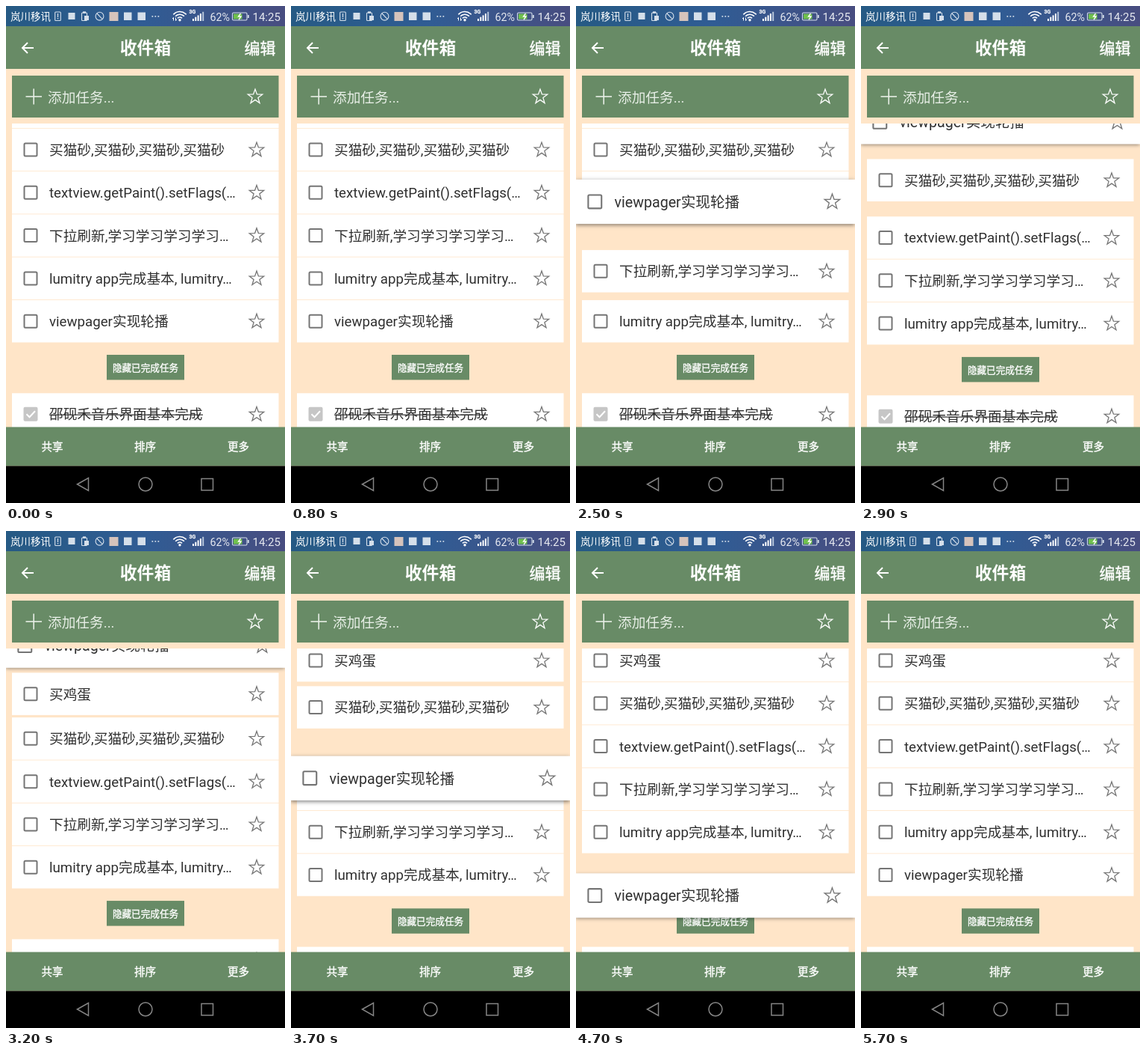
Write an HTML page with a canvas that moves like this. It is 374 px wide and 664 px high and loops after 6.4 s.

```html
<!DOCTYPE html>
<html lang="zh-CN">
<head>
<meta charset="utf-8">
<title>收件箱</title>
<style>
html, body { margin: 0; width: 100%; height: 100%; overflow: hidden; background: #000; }
canvas { display: block; width: 374px; height: 664px; }
</style>
</head>
<body>
<canvas id="stage" width="374" height="664"></canvas>
<script>
const ctx = document.getElementById('stage').getContext('2d');
const W = 374, LOOP = 6400;
const GREEN = '#688b66', PEACH = '#ffe5c8', INK = '#303030', GREY = '#757575';
const FONT = 'Roboto, "Noto Sans CJK SC", "Noto Sans CJK", sans-serif';
const PITCH = 57.3, CARD_X = 8, CARD_W = 357.5, CARD_H = 56.5, FIRST_ROW = 134.7;
const LIST_TOP = 157, LIST_BOTTOM = 563, MOVE = 250;

// up / down: when the dragged row passes each row on its way
const rows = [
  { text: '买鸡蛋', up: 2984, down: 3380 },
  { text: '买猫砂,买猫砂,买猫砂,买猫砂', up: 2750, down: 3500 },
  { text: 'textview.getPaint().setFlags(…', up: 2550, down: 3745 },
  { text: '下拉刷新,学习学习学习学习…', up: 2318, down: 3945 },
  { text: 'lumitry app完成基本, lumitry…', up: 2160, down: 4380 },
];

const dragPath = [
  [1950, 421.2], [2160, 364], [2318, 306.5], [2500, 261.7], [2750, 192], [2984, 146],
  [3080, 146], [3200, 153], [3380, 230], [3500, 287.5], [3700, 330], [3945, 402.5],
  [4200, 441], [4380, 459.5], [4650, 487], [4800, 487], [5050, 459.5],
];
const scrollPath = [[2850, 0], [2984, 12], [3200, 28], [3340, 38.3]];

const clamp = v => Math.max(0, Math.min(1, v));
const ease = (t, start) => (1 - Math.cos(Math.PI * clamp((t - start) / MOVE))) / 2;

// Monotone cubic through [time, value] points
function follow(path, t) {
  const last = path.length - 1;
  if (t <= path[0][0]) return path[0][1];
  if (t >= path[last][0]) return path[last][1];
  const slope = i => (path[i + 1][1] - path[i][1]) / (path[i + 1][0] - path[i][0]);
  const tangent = i => {
    if (i === 0 || i === last) return 0;
    const a = slope(i - 1), b = slope(i);
    return a * b <= 0 ? 0 : 2 * a * b / (a + b);
  };
  let i = 0;
  while (t > path[i + 1][0]) i++;
  const [t0, v0] = path[i], [t1, v1] = path[i + 1];
  const h = t1 - t0, u = (t - t0) / h, u2 = u * u, u3 = u2 * u;
  return v0 * (2 * u3 - 3 * u2 + 1) + v1 * (3 * u2 - 2 * u3)
    + h * (tangent(i) * (u3 - 2 * u2 + u) + tangent(i + 1) * (u3 - u2));
}

function rect(x, y, w, h, color) {
  ctx.fillStyle = color;
  ctx.fillRect(x, y, w, h);
}

function label(text, x, midY, size, color, weight = 400, align = 'left') {
  ctx.font = `${weight} ${size}px ${FONT}`;
  ctx.fillStyle = color;
  ctx.textAlign = align;
  ctx.fillText(text, x, midY + size * 0.37);
  if (weight === 500) { // CJK faces lack a medium weight
    ctx.strokeStyle = color;
    ctx.lineWidth = 0.35;
    ctx.strokeText(text, x, midY + size * 0.37);
  }
}

function line(points, color, width, close) {
  ctx.beginPath();
  points.forEach(([x, y]) => ctx.lineTo(x, y));
  if (close) ctx.closePath();
  ctx.strokeStyle = color;
  ctx.lineWidth = width;
  ctx.stroke();
}

function ring(x, y, r, color, width, from = 0, to = Math.PI * 2) {
  ctx.beginPath();
  ctx.arc(x, y, r, from, to);
  ctx.strokeStyle = color;
  ctx.lineWidth = width;
  ctx.stroke();
}

function box(x, y, w, h, r, color, width) {
  ctx.beginPath();
  ctx.roundRect(x, y, w, h, r);
  ctx.strokeStyle = color;
  ctx.lineWidth = width;
  ctx.stroke();
}

function star(x, y, color) {
  const points = [];
  for (let i = 0; i < 10; i++) {
    const r = i % 2 ? 4.1 : 10.2, a = (i / 5 - 0.5) * Math.PI;
    points.push([x + r * Math.cos(a), y + 0.3 + r * Math.sin(a)]);
  }
  line(points, color, 1.3, true);
}

function rowContent(text, y) {
  box(24.5, y - 8.5, 17, 17, 1.5, GREY, 2);
  label(text, 58, y, 18.7, INK);
  star(336, y, GREY);
}

function row(text, y) {
  rect(CARD_X, y - CARD_H / 2, CARD_W, CARD_H, '#fff');
  rowContent(text, y);
}

function draggedRow(text, y, lift) {
  const s = 1 + 0.05 * lift;
  ctx.save();
  ctx.translate(187, y);
  ctx.scale(s, s);
  ctx.translate(-187, -y);
  ctx.save();
  ctx.shadowColor = `rgba(0,0,0,${0.45 * lift})`;
  ctx.shadowBlur = 5 * lift;
  ctx.shadowOffsetY = 1.6 * lift;
  rect(CARD_X, y - CARD_H / 2, CARD_W, CARD_H, '#fff');
  ctx.restore();
  rowContent(text, y);
  ctx.restore();
}

function doneRow(y) {
  rect(CARD_X, y - 28, CARD_W, CARD_H, '#fff');
  ctx.beginPath();
  ctx.roundRect(23.5, y - 9.5, 19, 19, 2);
  ctx.fillStyle = '#c6c6c6';
  ctx.fill();
  line([[27.5, y], [31.5, y + 4], [39, y - 4]], '#fff', 2);
  label('邵砚禾音乐界面基本完成', 58, y, 18.7, INK);
  rect(58, y + 0.3, 206, 1.2, INK);
  star(336, y, GREY);
}

function list(t) {
  const scroll = follow(scrollPath, t);
  ctx.save();
  ctx.beginPath();
  ctx.rect(0, LIST_TOP, W, LIST_BOTTOM - LIST_TOP);
  ctx.clip();
  rows.forEach((r, i) => {
    const slot = i + ease(t, r.up) - ease(t, r.down);
    row(r.text, FIRST_ROW + PITCH * slot + scroll);
  });
  rect(135, 466 + scroll, 104, 33.5, GREEN);
  label('隐藏已完成任务', 187, 483 + scroll, 12.6, '#fff', 500, 'center');
  doneRow(545.3 + scroll);
  draggedRow('viewpager实现轮播', follow(dragPath, t), ease(t, 1500) - ease(t, 4800));
  ctx.restore();
}

function statusBar(t) {
  const pale = '#d5dfea';
  const sky = ctx.createLinearGradient(0, 0, W, 0);
  sky.addColorStop(0, '#265a84');
  sky.addColorStop(0.5, '#305c94');
  sky.addColorStop(1, '#484d80');
  rect(0, 0, W, 27, sky);
  label('岚川移讯', 6, 14, 13.5, '#fff');

  box(65.7, 8, 7.6, 11.5, 1, pale, 1.1);
  line([[69.5, 10], [69.5, 15]], pale, 1.3);
  rect(68.8, 16, 1.4, 1.4, pale);
  rect(83.5, 9, 9, 9, pale);
  box(101.5, 9, 7, 10.5, 1, pale, 1.1);
  rect(103, 7.3, 4, 2.5, pale);
  rect(105, 13, 6, 6, pale);
  ring(125.5, 13.7, 5.4, pale, 1.1);
  line([[122, 10], [129, 17.4]], pale, 1.1);
  rect(138.5, 8, 12, 12, '#d6c3bb');
  rect(158, 8.5, 10.5, 10.5, pale);
  rect(176.5, 8.5, 10.5, 10.5, pale);
  for (let i = 0; i < 3; i++) rect(195.5 + i * 4, 13, 1.7, 1.7, pale);

  for (const r of [4, 7.8, 11.5]) ring(233, 19, r, '#fff', 1.6, -Math.PI * 0.77, -Math.PI * 0.23);
  ctx.beginPath();
  ctx.arc(233, 18.7, 1.7, 0, Math.PI * 2);
  ctx.fillStyle = '#fff';
  ctx.fill();
  if (t < 2600) {
    line([[224.5, 19.5], [224.5, 15.5], [223, 17]], '#fff', 1);
    line([[227.5, 15.5], [227.5, 19.5], [229, 18]], '#fff', 1);
  }
  label('3G', 245.5, 7.5, 7, '#fff', 500);
  for (let i = 0; i < 5; i++) rect(250 + i * 3.3, 17 - i * 2.3, 2, 3 + i * 2.3, i < 4 ? '#fff' : '#b9c8dc');
  label('62%', 273.5, 14.3, 14.3, '#e6e9f0');
  box(303.5, 9, 19.5, 10, 1.5, pale, 1.1);
  rect(324, 12, 1.7, 4, pale);
  rect(305, 10.5, 11.5, 7, '#6fc04d');
  line([[314.5, 10], [311.5, 14], [315, 14], [312, 18.3]], '#fff', 1.3);
  label('14:25', 330.5, 14.3, 15, '#e6e9f0');
}

function header() {
  rect(0, 27, W, 57, GREEN);
  line([[37, 56], [22.5, 56]], '#fff', 2);
  line([[29, 49], [22, 56], [29, 63]], '#fff', 2);
  label('收件箱', 187, 56, 22.8, '#fff', 700, 'center');
  label('编辑', 319.5, 56.5, 21, '#fff', 500);

  rect(CARD_X, 93, CARD_W, 56, GREEN);
  line([[26.5, 121], [48, 121]], '#e8efe7', 1.6);
  line([[37.2, 110.5], [37.2, 131.5]], '#e8efe7', 1.6);
  label('添加任务...', 56, 122, 18.7, '#e8efe7');
  star(334, 121, '#fff');
}

function footer() {
  rect(0, 562.5, W, 52, GREEN);
  [['共享', 62], ['排序', 186.5], ['更多', 311.5]].forEach(([text, x]) =>
    label(text, x, 589, 14.5, '#fff', 500, 'center'));
  rect(0, 614.5, W, 49.5, '#000');
  line([[95.5, 639], [110.5, 630.5], [110.5, 647.5]], '#858585', 1.5, true);
  ring(187, 639, 9, '#858585', 1.5);
  box(262, 631.5, 15.5, 15.5, 0, '#858585', 1.5);
}

function frame(now) {
  const t = now % LOOP;
  rect(0, 0, W, 664, PEACH);
  list(t);
  statusBar(t);
  header();
  footer();
}

const start = performance.now();
function tick() {
  frame(performance.now() - start);
  requestAnimationFrame(tick);
}
tick();
</script>
</body>
</html>
```
